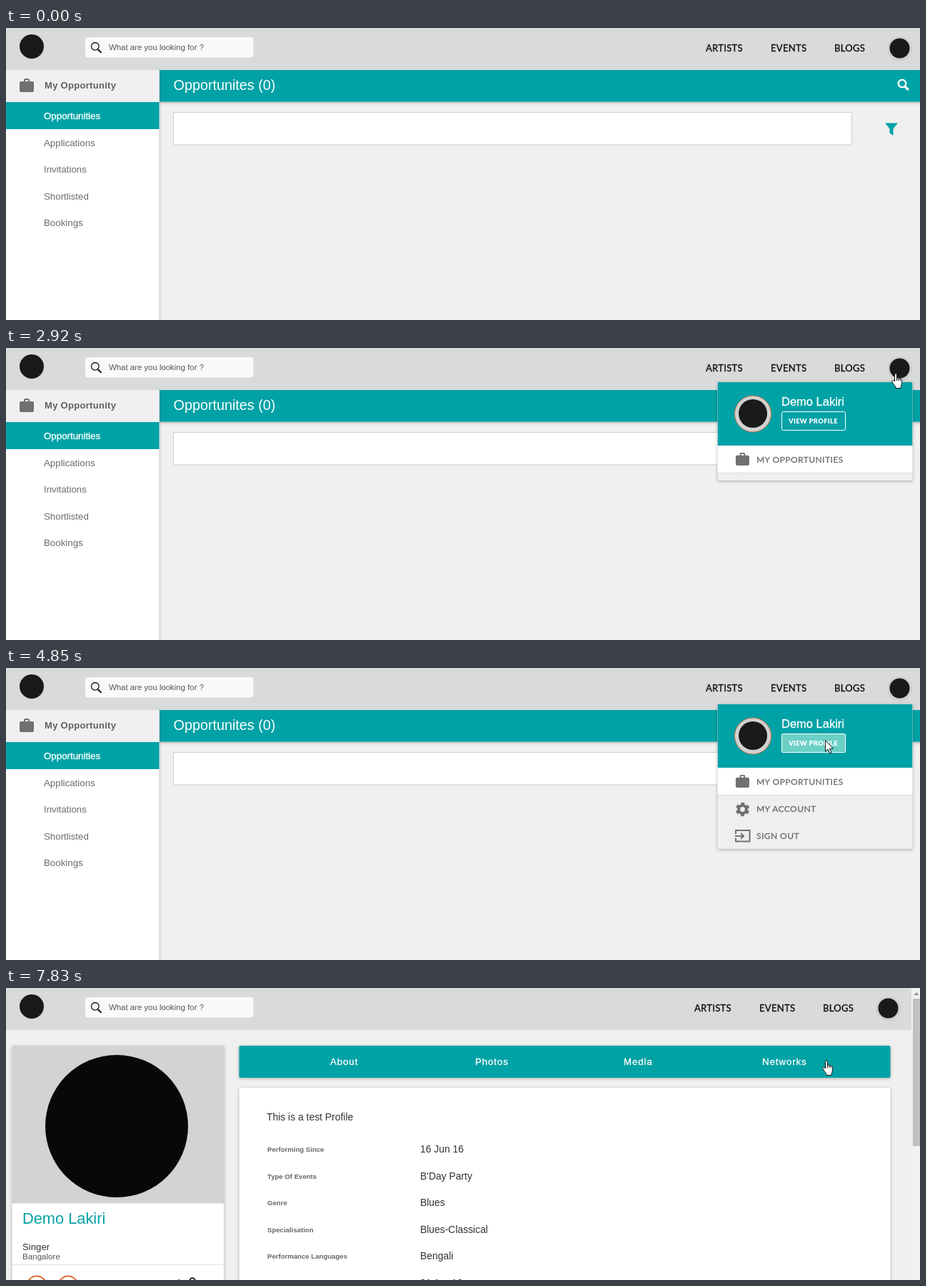
Write an HTML page that moves like this. It is 1280 px wide and 410 px high and loops after 8 s.

```html
<!DOCTYPE html>
<html lang="en">
<head>
<meta charset="utf-8">
<title>Opportunities</title>
<style>
html, body { margin: 0; width: 100%; height: 100%; overflow: hidden; background: #f0f0f0; }
svg { display: block; width: 1280px; height: 410px; font-family: "Liberation Sans", Arial, sans-serif; }
.caps { font-family: Lato, "Open Sans", sans-serif; }
.nav { font-size: 13px; letter-spacing: .3px; fill: #111; stroke: #111; stroke-width: .35; }
.side { font-size: 13.3px; fill: #6b6b6b; }
.item { font-size: 12px; letter-spacing: .45px; fill: #6c6c6c; stroke: #6c6c6c; stroke-width: .3; }
.tabs { font-size: 13.3px; letter-spacing: .9px; fill: #fff; stroke: #fff; stroke-width: .3; }
.label { font-size: 9.6px; font-weight: bold; fill: #666; }
.value { font-size: 13.9px; fill: #333; }
.teal { fill: #00a2a6; }
.shadow { filter: drop-shadow(0 1px 2px rgba(0, 0, 0, .3)); }
.line { fill: none; stroke-width: 2; }
</style>
</head>
<body>
<svg viewBox="0 0 1280 410">
  <defs>
    <path id="case" fill="#707070" d="M20 6h-4V4c0-1.1-.9-2-2-2h-4c-1.1 0-2 .9-2 2v2H4c-1.1 0-2 .9-2 2v11c0 1.1.9 2 2 2h16c1.1 0 2-.9 2-2V8c0-1.1-.9-2-2-2zm-6 0h-4V4h4z"/>
    <clipPath id="panelClip"><rect id="opening" x="996.5" y="51" width="273"/></clipPath>
    <clipPath id="buttonClip"><rect x="1086" y="92" width="90" height="27" rx="2"/></clipPath>
  </defs>

  <rect width="1280" height="410" fill="#f0f0f0"/>
  <g id="home">
    <rect class="shadow teal" x="215" y="59" width="1070" height="44.5"/>
    <rect class="shadow" y="59" width="214.5" height="360" fill="#fff"/>
    <rect y="59" width="214.5" height="45" fill="#f0f0f0"/>
    <rect class="teal" y="104" width="214.5" height="38"/>
    <use href="#case" x="17" y="69"/>
    <text x="54" y="85" font-size="13" font-weight="bold" letter-spacing=".3" fill="#616161">My Opportunity</text>
    <g id="side" class="side"></g>
    <text x="234.5" y="87" font-size="19.8" fill="#fff">Opportunites (0)</text>
    <g fill="none" stroke="#fff"><circle cx="1255" cy="78" r="5.2" stroke-width="2.6"/><path d="M1258.8 82l5 5" stroke-width="3.2"/></g>
    <rect x="234.5" y="118.5" width="950" height="45.5" rx="1.5" fill="#fff" stroke="#ccc"/>
    <path class="teal" d="M1231 133.5h18l-6.5 8v9.5l-5-3.5v-6z"/>
  </g>

  <g id="profile">
    <rect class="shadow" x="8.5" y="81" width="296.5" height="340" rx="2" fill="#fff"/>
    <rect x="8.5" y="81" width="296.5" height="221.5" fill="#d3d3d3"/>
    <circle cx="155" cy="194" r="100" fill="#080808"/>
    <text class="teal" x="23" y="331" font-size="21.8">Demo Lakiri</text>
    <text x="23" y="368" font-size="13.2" fill="#333">Singer</text>
    <text x="23" y="381" font-size="11.6" fill="#555">Bangalore</text>
    <rect x="8.5" y="388" width="296.5" height="1" fill="#e4e4e4"/>
    <g class="line" stroke="#df6f38"><circle cx="43" cy="418" r="13.5"/><circle cx="87" cy="418" r="13.5"/></g>
    <circle class="line" cx="261" cy="411" r="3.7" stroke="#222"/>
    <rect x="241" y="409" width="2" height="1" fill="#555"/>
    <rect class="shadow teal" x="326.5" y="81" width="912" height="45" rx="2"/>
    <g class="tabs"><text x="454" y="108">About</text><text x="657" y="108">Photos</text><text x="865" y="108">Media</text><text x="1059" y="108">Networks</text></g>
    <rect class="shadow" x="326.5" y="140" width="912" height="290" rx="2" fill="#fff"/>
    <text class="value" x="365" y="186">This is a test Profile</text>
    <g id="facts"></g>
  </g>

  <rect width="1280" height="59" fill="#d9dbda"/>
  <circle cx="36" cy="26" r="17" fill="#1a1a1a"/>
  <rect x="111" y="13" width="235.5" height="28.5" rx="4" fill="#f8faf9"/>
  <g fill="none" stroke="#111"><circle cx="124.8" cy="25.8" r="5.3" stroke-width="1.3"/><path d="M128.8 30l4.7 4.8" stroke-width="2"/></g>
  <text x="144" y="31" font-size="11.4" fill="#555">What are you looking for ?</text>
  <g id="nav">
    <g class="caps nav"><text x="980" y="33">ARTISTS</text><text x="1071" y="33">EVENTS</text><text x="1160" y="33">BLOGS</text></g>
    <circle cx="1251.5" cy="29" r="17.5" fill="#cfd0d0"/>
    <circle cx="1251.5" cy="28.5" r="14" fill="#1a1a1a"/>
  </g>

  <g id="scrollbar">
    <rect x="1268" width="12" height="410" fill="#f1f1f1"/>
    <rect x="1270" y="15" width="10" height="207" fill="#c1c1c1"/>
    <path d="M1271.5 10h7l-3.5-4z" fill="#8a8a8a"/>
  </g>

  <g id="menu">
    <rect id="back" class="shadow" x="996.5" y="51" width="273" fill="#efefef"/>
    <g clip-path="url(#panelClip)">
      <rect class="teal" x="996.5" y="51" width="273" height="89"/>
      <rect x="996.5" y="140" width="273" height="38" fill="#fff"/>
      <rect x="996.5" y="178" width="273" height="1" fill="#d8d8d8"/>
      <circle cx="1046" cy="95.5" r="25.5" fill="#d2d2d2" stroke="#c8703c"/>
      <circle cx="1046" cy="95" r="20" fill="#1a1a1a"/>
      <text x="1086" y="84" font-size="16.5" fill="#fff" stroke="#fff" stroke-width=".3">Demo Lakiri</text>
      <g clip-path="url(#buttonClip)">
        <rect id="hover" x="1086" y="92" width="90" height="27" fill="#2bbbad"/>
        <circle id="ripple" cx="1147" cy="101" fill="#fff"/>
      </g>
      <rect x="1086.5" y="92.5" width="89" height="26" rx="2" fill="none" stroke="#fff"/>
      <text class="caps" x="1096" y="109" font-size="9.4" font-weight="900" letter-spacing=".3" fill="#fff">VIEW PROFILE</text>
      <use href="#case" transform="translate(1020 148) scale(.95)"/>
      <g class="line" stroke="#707070">
        <circle cx="1031.5" cy="198.5" r="5.4" stroke-width="4"/>
        <circle cx="1031.5" cy="198.5" r="8.2" stroke-width="3" stroke-dasharray="4.7 3.89" stroke-dashoffset="-1.95"/>
        <path d="M1022 233v-5h19.5v15.5H1022v-5M1021 236h12m-4-4l4 4-4 4"/>
      </g>
      <g class="caps item"><text x="1051" y="164">MY OPPORTUNITIES</text><text x="1051" y="202">MY ACCOUNT</text><text x="1051" y="240">SIGN OUT</text></g>
    </g>
  </g>

  <g id="cursor" fill="#fff" stroke="#111" stroke-linejoin="round">
    <path id="arrow" d="M.5.5v15.8l3.6-3.4 2.6 5.9 2.3-1-2.5-5.7h5z"/>
    <path id="hand" transform="translate(-4)" d="M4.5 12V2.2a1.5 1.5 0 0 1 3 0V7.5a1.4 1.4 0 0 1 2.4.6 1.4 1.4 0 0 1 2.3.7 1.2 1.2 0 0 1 2.2.9V15c0 2.5-1.6 3.5-1.6 6.5H6.2C6.2 18.5 3 16.5 1 12.5 0 10.5 2.3 9.8 3.3 11zM7.5 7.5V11m2.5-3v3m2.3-2v2"/>
    <circle id="busy" cx="13.5" cy=".5" r="5.8" fill="none" stroke="#4aa3d8" stroke-width="2.4"/>
  </g>
</svg>

<script>
const $ = id => document.getElementById(id);
const label = (x, y, str, cls = "") => `<text class="${cls}" x="${x}" y="${y}">${str}</text>`;
const show = (id, on) => $(id).style.display = on ? "" : "none";

$("side").innerHTML = ["Opportunities", "Applications", "Invitations", "Shortlisted", "Bookings"]
  .map((s, i) => label(53, 128 + Math.round(i * 37.6), s)).join("");
$("side").firstChild.style = "fill: #fff; stroke: #fff; stroke-width: .3px";

$("facts").innerHTML = [
  ["Performing Since", "16 Jun 16"], ["Type Of Events", "B'Day Party"], ["Genre", "Blues"],
  ["Specialisation", "Blues-Classical"], ["Performance Languages", "Bengali"], ["", "21 Apr 18"]
].map(([key, value], i) => {
  const dy = Math.round(i * 37.6);
  return label(366, 229.5 + dy, key, "label") + label(580, 231 + dy, value, "value");
}).join("");

// Linear interpolation through rows of [time, ...values].
function track(rows, t) {
  let i = 0;
  while (i < rows.length - 2 && t >= rows[i + 1][0]) i++;
  const [a, b] = [rows[i], rows[i + 1]];
  const p = Math.min(1, Math.max(0, (t - a[0]) / (b[0] - a[0])));
  return a.slice(1).map((v, k) => v + (b[k + 1] - v) * p);
}

// Screen updates: start, end, number of pictures.
const bursts = [[390, 860, 7], [1280, 2010, 10], [2590, 2750, 3], [2920, 3000, 2],
  [3140, 3910, 11], [4000, 4470, 7], [4610, 5080, 7], [5250, 5250, 1]];
function sample(t) {
  const burst = bursts.filter(b => b[0] <= t).pop();
  if (!burst) return 0;
  const [a, b, n] = burst;
  if (t >= b) return b;
  const step = (b - a) / (n - 1);
  return a + Math.floor((t - a) / step + 1e-6) * step;
}

const pointer = [[390, 1212, 382], [860, 1235, 133], [1200, 1235, 133], [2010, 1244, 35],
  [3300, 1244, 35], [3448, 1235, 43], [3910, 1164, 82], [4470, 1147, 101]];
const panel = [[2590, 41, 100], [2750, 44, 142], [2920, 48, 186], [3000, 49, 213], [3217, 51, 254]];

function draw(t) {
  const s = sample(t), onProfile = t >= 7660;
  show("home", !onProfile);
  show("profile", onProfile);
  show("scrollbar", onProfile);
  $("nav").setAttribute("transform", `translate(${onProfile ? -16 : 0})`);

  const [top, bottom] = track(panel, s);
  show("menu", t >= 2590 && !onProfile);
  $("menu").setAttribute("transform", `translate(0 ${top - 51})`);
  for (const id of ["back", "opening"]) $(id).setAttribute("height", bottom - top);

  $("hover").style.opacity = track([[4235, 0], [4470, 1]], s)[0];
  const [r, alpha] = track([[4610, 8, .3], [4845, 80, .3], [5250, 80, 0]], s);
  $("ripple").setAttribute("r", r);
  $("ripple").style.opacity = s < 4610 ? 0 : alpha;

  const [x, y] = track(pointer, s).map(Math.round);
  const onFilter = y >= 133 && y <= 151 && x > 1230;
  const onAvatar = Math.hypot(x - 1251.5, y - 29) < 18;
  const onButton = y >= 92 && y <= 118 && x < 1176 && (t < 4610 || t >= 6410);
  const hand = onFilter || onAvatar || onButton;
  show("cursor", t >= 390);
  $("cursor").setAttribute("transform", `translate(${x} ${y})`);
  show("hand", hand);
  show("arrow", !hand);
  show("busy", t >= 5580 && t < 6410);
}

const start = performance.now();
function frame() {
  draw((performance.now() - start) % 8000);
  requestAnimationFrame(frame);
}
frame();
</script>
</body>
</html>
```
